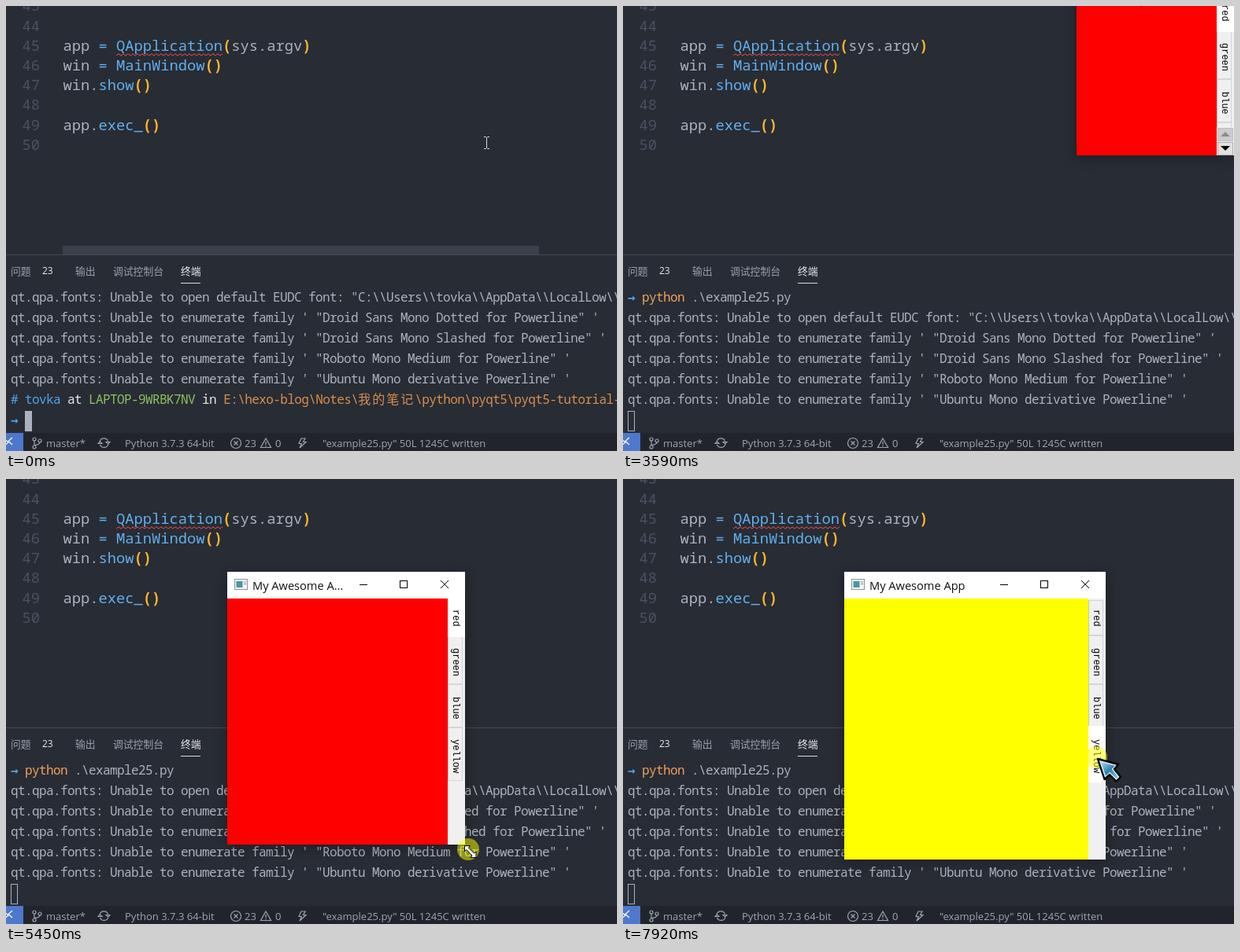
Recreate the animation shown at these times as an HTML page. Size 776 px wide and 566 px high, loop 7.99 s.

```html
<!DOCTYPE html>
<html lang="zh">
<head>
<meta charset="utf-8">
<title>Tab demo</title>
<style>
html, body { margin: 0; width: 100%; height: 100%; overflow: hidden; background: #282c34; }
#stage { position: relative; width: 776px; height: 566px; overflow: hidden; background: #282c34; color: #abb2bf; }
#stage div, #stage svg { position: absolute; white-space: pre; }
b { font-weight: inherit; }
.code { font: 18.75px/25.2px "Noto Sans Mono", "DejaVu Sans Mono", monospace; }
.code i { font-style: normal; color: #495162; position: absolute; left: 20.5px; font-weight: 300; }
.code span { position: absolute; left: 72.5px; }
.fn { color: #61afef; }
.br { color: #ffb62c; font-weight: 600; }
#bar { left: 72px; top: 305px; width: 605px; height: 11px; background: #3b404b; }
#rule { left: 0; top: 316px; width: 776px; height: 1px; background: #484a50; }
.tab { top: 327px; font: 12.8px/20px "Noto Sans CJK SC", "Noto Sans CJK", sans-serif; color: #9aa1ad; }
.on { color: #e7eaef; }
#line { left: 222px; top: 352px; width: 25px; height: 1px; background: #d7dae0; }
.term { font: 500 16px/26px "Noto Sans Mono", "DejaVu Sans Mono", monospace; letter-spacing: -.6px; }
#view { left: 0; top: 357px; width: 776px; height: 156px; overflow: hidden; }
#prompt { left: 6px; top: 513px; }
.cmd { color: #f0a05a; }
.blue { color: #4aa5f0; }
.go { color: #4aa5f0; font: 700 16px/1px "DejaVu Sans Mono", monospace; }
.host { color: #8cc265; }
.path { color: #d98d4f; }
.wh { color: #e6e6e6; }
.cjk { letter-spacing: 2px; font-family: "Noto Sans CJK SC", "Noto Sans CJK", sans-serif; font-weight: 400; line-height: 1px; }
#caret { top: 515px; width: 9px; height: 26px; box-sizing: border-box; border: 1px solid #abb2bf; }
#status { left: 0; top: 543px; width: 776px; height: 23px; background: #21252b; color: #9da5b4; font: 13px/26px "Open Sans", sans-serif; }
#status > * { top: 0; }
#remote { left: 0; width: 22px; height: 23px; background: #4d78cc; }
#win { isolation: isolate; background: #f0f0f0; box-shadow: 0 3px 16px rgba(0,0,0,.32); font: 14.6px/34px "Open Sans", sans-serif; color: #111; }
#head { left: 0; top: 0; width: 100%; height: 34px; background: #fff; }
#title { left: 32px; top: 0; height: 34px; overflow: hidden; text-overflow: ellipsis; }
#btns { right: 0; top: 0; }
#fill { left: 0; top: 34px; right: 22px; bottom: 0; }
#side { right: 0; top: 34px; width: 22px; bottom: 0; overflow: hidden; }
#side .t { left: 0; width: 19px; box-sizing: border-box; border: 1px solid #d5d5d5; border-left-color: #c8c8c8; background: #f0f0f0; }
#side .t.sel { width: 22px; background: #fff; border-color: #fff; z-index: 1; }
#side .t span { position: absolute; left: 0; width: 17px; writing-mode: vertical-rl; text-align: center; font: 12px/17px "Liberation Mono", monospace; color: #000; }
#scroll { right: 0; bottom: 0; z-index: 2; }
#spot { width: 28px; height: 28px; border-radius: 50%; background: rgba(255,255,0,.5); }
</style>
</head>
<body>
<div id="stage">
  <div id="code" style="left:0;top:0"></div>
  <svg style="left:140px;top:60px" width="135" height="4">
    <pattern id="zig" width="6" height="4" patternUnits="userSpaceOnUse"><path d="M0 3.2L3 .8L6 3.2" fill="none" stroke="#f0504a"/></pattern>
    <rect width="135" height="4" fill="url(#zig)"/>
  </svg>
  <div id="bar"></div>
  <div id="rule"></div>
  <div class="tab" style="left:6px">问题</div>
  <div class="tab on" style="left:46px;font-family:'Open Sans',sans-serif;font-size:12px">23</div>
  <div class="tab" style="left:88px">输出</div>
  <div class="tab" style="left:136px">调试控制台</div>
  <div class="tab on" style="left:222px;font-weight:500">终端</div>
  <div id="line"></div>

  <div id="view" class="term"><div id="rows" style="left:6px"></div></div>
  <div id="prompt" class="term"><b class="go">→</b> <span id="typed"></span></div>
  <div id="caret"></div>

  <div id="status">
    <div id="remote"></div>
    <svg style="left:0" width="400" height="23" fill="none" stroke="#9da5b4" stroke-width="1.2">
      <path d="M-2 8L3 12L-2 16M8 6L3 10.500L8 15" stroke="#fff"/>
      <circle cx="36" cy="8" r="2"/><circle cx="36" cy="18" r="2"/><circle cx="43" cy="10" r="2"/>
      <path d="M36 10V16M43 12Q43 15 36 15.500"/>
      <path d="M119 11A5.500 5.500 0 0 1 129.500 10.500M130 14A5.500 5.500 0 0 1 119.500 15M127 11.500H132L129.800 14ZM117 13.500H122L119.300 11Z"/>
      <circle cx="292" cy="13" r="6.500"/><path d="M289.500 10.500L294.500 15.500M294.500 10.500L289.500 15.500"/>
      <path d="M330 7L336.500 18.500H323.500ZM330 11V15M330 16V17.300"/>
      <path d="M375 7H380L377.500 11.500H381L373 19L375.500 13.500H372Z"/>
    </svg>
    <div style="left:51px">master*</div>
    <div style="left:151px">Python 3.7.3 64-bit</div>
    <div style="left:303px">23</div>
    <div style="left:342px">0</div>
    <div style="left:402px">"example25.py" 50L 1245C written</div>
  </div>

  <div id="win">
    <div id="head">
      <svg style="left:9px;top:9px" width="17" height="15">
        <rect x=".5" y=".5" width="16" height="13" fill="#f4f6f7" stroke="#8b9499"/>
        <rect x="2.500" y="3" width="8" height="8" fill="#4d94a3"/><path d="M12 4H15M12 6.500H15" stroke="#7b8a90"/>
      </svg>
      <div id="title"></div>
      <svg id="btns" width="156" height="34" fill="none" stroke="#000">
        <path d="M22 16.500H32"/><rect x="73.500" y="11.500" width="9" height="9"/><path d="M125 11L135 21M135 11L125 21"/>
      </svg>
    </div>
    <div id="fill"></div>
    <div id="side">
      <svg id="scroll" width="22" height="36">
        <rect width="22" height="36" fill="#f0f0f0"/>
        <rect x="1.500" y="1.500" width="19" height="16" fill="#ccc" stroke="#bfbfbf"/>
        <rect x="1.500" y="19.500" width="19" height="16" fill="#e1e1e1" stroke="#adadad"/>
        <path d="M5 12L11 6L17 12Z" fill="#8d8d8d"/><path d="M5 24L11 30L17 24Z"/>
      </svg>
    </div>
  </div>

  <div id="spot"></div>
  <svg id="beam" width="9" height="18" style="margin:-9px 0 0 -4px" fill="none" stroke="#d8dade"><path d="M1 1.500H3.500L4.500 2.500L5.500 1.500H8M4.500 2V16M1 16.500H3.500L4.500 15.500L5.500 16.500H8"/></svg>
  <svg id="arrow" width="34" height="34" style="margin:-1px 0 0 -1px">
    <linearGradient id="g" x1="0" y1="0" x2="1" y2="1"><stop offset="0" stop-color="#a9dcee"/><stop offset=".5" stop-color="#2f82a8"/><stop offset="1" stop-color="#8ecbe2"/></linearGradient>
    <path d="M2 2L28 9L23 15L31 25L25.500 30.500L17 22L10.500 28Z" fill="#d3edf6" stroke="#000" stroke-width="2.400" stroke-linejoin="round"/>
    <path d="M6 6L23.500 10.700L19.800 15L27.500 25L25.500 27L17 18.800L12 23.500Z" fill="url(#g)"/>
  </svg>
  <svg id="grip" width="18" height="18" style="margin:-7px 0 0 -7px" fill="#fff" stroke="#000"><path d="M1.500 1.500H8.500L6.500 4L13.500 11L16 9V16.500H9L11 14L4 6.500L1.500 8.500Z"/></svg>
</div>
<script>
const LOOP = 7990;
const $ = id => document.getElementById(id);
const tag = (cls, s) => `<b class="${cls}">${s}</b>`;
const fn = s => tag('fn', s), br = s => tag('br', s);

const code = ['', '',
  `app ${fn('=')} ${fn('QApplication')}${br('(')}sys.argv${br(')')}`,
  `win ${fn('=')} ${fn('MainWindow')}${br('()')}`,
  `win.${fn('show')}${br('()')}`, '', `app.${fn('exec_')}${br('()')}`, ''];
$('code').innerHTML = code.map((s, i) =>
  `<div class="code" style="top:${-13.6 + i * 25.2}px"><i>${43 + i}</i><span>${s}</span></div>`).join('');

const fonts = ['Droid Sans Mono Dotted for', 'Droid Sans Mono Slashed for', 'Roboto Mono Medium for', 'Ubuntu Mono derivative'];
const log = ['qt.qpa.fonts: Unable to open default EUDC font: "C:\\\\Users\\\\tovka\\\\AppData\\\\LocalLow\\\\',
  ...fonts.map(f => `qt.qpa.fonts: Unable to enumerate family ' "${f} Powerline" '`)];
const where = `${tag('blue', '# tovka')} ${tag('wh', 'at')} ${tag('host', 'LAPTOP-9WRBK7NV')} ${tag('wh', 'in')} ` +
  tag('path', `E:\\hexo-blog\\Notes\\${tag('cjk', '我的笔记')}\\python\\pyqt5\\pyqt5-tutorial-`);
const command = tag('cmd', 'python') + ' .\\example25.py';
$('rows').innerHTML = [...log, where, `${tag('go', '→')} ${command}`, ...log]
  .map((s, i) => `<div style="top:${i * 26}px">${s}</div>`).join('');
$('typed').innerHTML = command;

// name, top and bottom inside the side strip
const tabs = [['red', 2, 47], ['green', 47, 109], ['blue', 109, 164], ['yellow', 164, 232]].map(([name, a, b], i) => {
  const el = document.createElement('div');
  el.innerHTML = `<span>${name}</span>`;
  $('side').append(el);
  return { name, a, b, el, pad: i ? 3 : 0 };
});
const fills = { red: '#f00', green: '#008000', blue: '#00f', yellow: '#ff0' };

const scrolls = [1080, 1310, 1460, 1780, 1780, 1950];
const parked = [636, -246];
const drag = [[630, -200], [602, -115], [576, -50], [520, -5], [465, 30], [395, 70], [335, 98], [296, 113], [281, 118], [281, 118], [281, 118]];
const sizes = [[206, 250], [225, 275], [250, 300], [272, 322], [290, 338], [302, 347], [315, 358], [326, 364], [332, 366], [332, 366], [332, 366]];
const moves = [
  [0, 1, [[610, 174]]],
  [2420, 2580, [[634, 110], [654, 51], [654, -60]]],
  [4130, 4210, [[340, 157], [437, 228]]],
  [4290, 4840, [[462, 262], [484, 295], [500, 322], [506, 336], [500, 340], [490, 353], [484, 358], [482, 359]]],
  [5840, 5841, [[614, 474]]],
  [5920, 6470, [[622, 440], [636, 390], [638, 326], [628, 255], [612, 194], [604, 170], [603, 190], [597, 230]]],
  [6990, 7760, [[597, 243], [598, 260], [598, 276], [597, 286], [597, 288], [597, 288], [597, 288], [599, 302], [601, 326], [602, 346], [602, 355]]]
];
const presses = [[3440, 4130], [4840, 5830], [6620, 6840], [7290, 7525], [7840, LOOP]];

// stepped position on a list spread evenly from a to b
const pick = (list, t, a, b) => {
  const k = Math.floor((t - a) / (b - a) * (list.length - 1) + .1);
  return list[Math.max(0, Math.min(list.length - 1, k))];
};
const show = (el, on) => { el.style.display = on ? '' : 'none'; };
const place = (el, x, y) => { el.style.left = x + 'px'; el.style.top = y + 'px'; };

function mouseAt(t, pos, size) {
  if (t >= 3440 && t < 4130) return [pos[0] + 58, pos[1] + 20];
  if (t >= 5060 && t < 5830) {
    const lag = t < 5680 ? [5, 7] : [2, 2];
    return [pos[0] + size[0] + lag[0], pos[1] + size[1] + lag[1]];
  }
  const [a, b, pts] = moves.filter(m => m[0] <= t).pop();
  return pick(pts, t, a, b);
}

function drawTerminal(t) {
  const n = scrolls.filter(s => s <= t).length;
  $('rows').style.top = -26 * n + 'px';
  show($('prompt'), !n);
  show($('typed'), t >= 530);
  $('caret').style.left = (n ? 6 : t >= 530 ? 213 : 24) + 'px';
  $('caret').style.background = t < 2030 ? '#abb2bf' : 'none';
}

function drawWindow(t, pos, [w, h]) {
  const win = $('win');
  show(win, t >= 2030);
  place(win, ...pos);
  win.style.width = w + 'px';
  win.style.height = h + 'px';
  $('title').textContent = w < 215 ? 'M' : 'My Awesome App';
  $('title').style.maxWidth = w < 215 ? '12px' : w - 184 + 'px';
  const name = t < 6620 ? 'red' : t < 7290 ? 'green' : t < 7840 ? 'blue' : 'yellow';
  $('fill').style.background = fills[name];
  for (const { name: id, a, b, el, pad } of tabs) {
    const grow = id === name ? 2 : 0;
    el.className = grow ? 't sel' : 't';
    el.style.top = a - grow + 'px';
    el.style.height = b - a + 2 * grow + 'px';
    const label = el.firstChild.style;
    label.top = grow + pad - 1 + 'px';
    label.height = b - a + 'px';
  }
  show($('scroll'), h - 34 < 232);
}

function render(t) {
  const pos = t < 3440 ? parked : pick(drag, t, 3440, 4210);
  const size = t < 5060 ? [200, 240] : pick(sizes, t, 5070, 5840);
  const [x, y] = mouseAt(t, pos, size);
  const grip = t >= 4675 && t < 5915;
  show($('bar'), t < 3280);
  drawTerminal(t);
  drawWindow(t, pos, size);
  place($('spot'), x - 15, y - 15);
  show($('spot'), presses.some(([a, b]) => t >= a && t < b));
  for (const id of ['beam', 'arrow', 'grip']) place($(id), x, y);
  show($('beam'), t < 2580);
  show($('arrow'), t >= 3440 && !grip);
  show($('grip'), grip);
}

const start = performance.now();
function tick() {
  render((performance.now() - start) % LOOP);
  requestAnimationFrame(tick);
}
tick();
</script>
</body>
</html>
```
